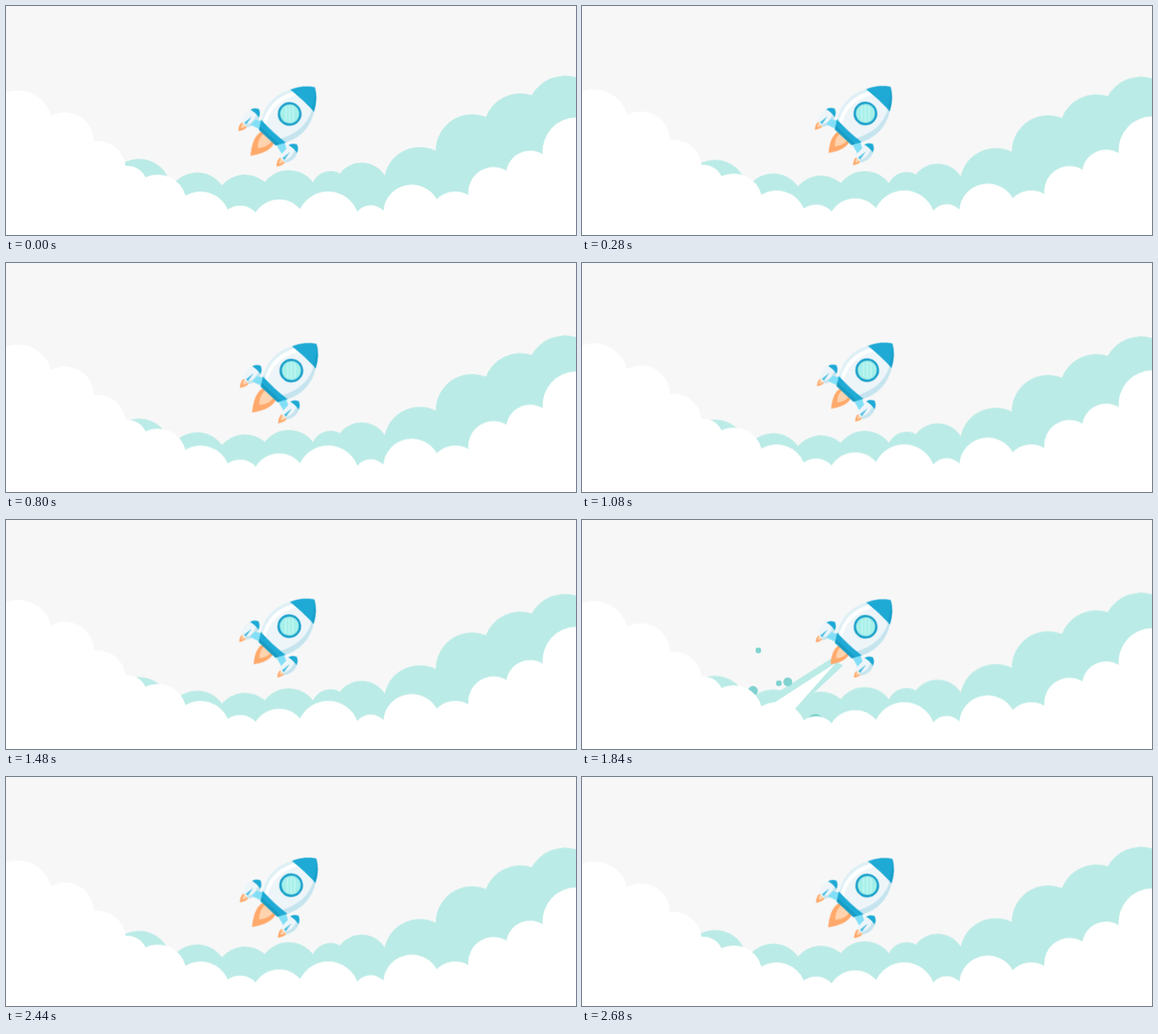
An HTML page for the animation above (2720 ms loop, 640 px wide and 258 px high).

```html
<!DOCTYPE html>
<html lang="en">
<head>
<meta charset="utf-8">
<title>Rocket above the clouds</title>
<style>
  html, body { margin: 0; width: 100%; height: 100%; overflow: hidden; background: #f7f7f7; }
  svg { display: block; width: 100%; height: 100%; }

  #back, #front { animation: drift 2720ms linear infinite; }
  #back { --shift: 5.2px; }
  #front { --shift: -5.8px; }
  @keyframes drift { 50% { transform: translateY(var(--shift)); } }

  #trail, #dots { transform-origin: 222px 212px; animation: 2720ms linear infinite; }
  #trail { animation-name: trail; }
  #dots { animation-name: spray; }
  @keyframes trail {
    0%, 63.2% { transform: scale(0); }
    66%, 70% { transform: none; }
    75%, 100% { transform: scale(0); }
  }
  @keyframes spray {
    0%, 63.2% { transform: scale(0); animation-timing-function: ease-out; }
    67.65% { transform: none; opacity: 1; }
    75% { transform: scale(1.3); opacity: 0; }
    100% { transform: scale(0); opacity: 0; }
  }
</style>
</head>
<body>
<svg viewBox="0 0 640 258">
  <path id="back" fill="#bbebe6" d="M114 208
    A35.5 35.5 0 0 1 184.9 205 A34 34 0 0 1 242.4 202.1 A34 34 0 0 1 290.6 198.2
    A34 34 0 0 1 344.6 198.5 A22 22 0 0 1 375 188.7 A30.5 30.5 0 0 1 425.3 190.9
    A40 40 0 0 1 482.5 163.2 A41 41 0 0 1 538.8 125 A41.5 41.5 0 0 1 590.3 100.5
    A42.5 42.5 0 0 1 640.5 80.6 V270 H114Z"/>

  <g id="trail">
    <path d="M280 156 L293 164 L240 214 L196 209Z" fill="#bbebe6"/>
    <path d="M285 161 L238 214 L211 209Z" fill="#fff"/>
  </g>
  <g id="dots" fill="#7fd3cf">
    <circle cx="198" cy="147" r="3.2"/>
    <circle cx="221" cy="184" r="3.2"/>
    <circle cx="231" cy="182.5" r="5"/>
    <circle cx="192" cy="192.5" r="5.5"/>
    <circle cx="262" cy="228" r="9.5"/>
  </g>

  <path id="front" fill="#fff" d="M0 97.6
    A38.5 38.5 0 0 1 50.7 124.2 A32 32 0 0 1 98.5 152.3 A32 32 0 0 1 134.3 180.2
    A22 22 0 0 1 156.6 193.1 A32 32 0 0 1 201.5 213.8 A33 33 0 0 1 249 229.2
    A24 24 0 0 1 280.3 232.7 A31 31 0 0 1 330.2 228.8 A35 35 0 0 1 394.5 231.8
    A19.5 19.5 0 0 1 423.8 230.5 A32 32 0 0 1 483.7 217.8 A29 29 0 0 1 519.2 213
    A28.5 28.5 0 0 1 561.9 185.4 A27 27 0 0 1 602.7 167.1 A38 38 0 0 1 640.5 125.5
    V270 H0Z"/>

  <defs>
    <g id="flame">
      <path d="M-9 0 C-14 10 -7 22 0 31 C7 22 14 10 9 0Z" fill="#ffa96b"/>
      <path d="M-6 0 C-8 8 -4 15 0 19 C4 15 8 8 6 0Z" fill="#ffd3ae"/>
    </g>
    <g id="pod">
      <g class="flame" data-y="42"><use href="#flame" transform="scale(.38)"/></g>
      <path d="M-6.5 26 C-9.5 32 -8 39 -4.5 43.5 H4.5 C8 39 9.5 32 6.5 26Z" fill="#eef5f9"/>
      <path d="M2.5 26 H6.5 C9.5 32 8 39 4.5 43.5 H1 C5 38 5 32 2.5 26Z" fill="#c5e4ee"/>
      <path d="M-6.5 26.5 Q-5 21.5 0 19.5 Q5 21.5 6.5 26.5 Q0 25 -6.5 26.5Z" fill="#1eaad5"/>
      <path d="M0 31 L1.6 42 H-1.6Z" fill="#4fc0e2"/>
    </g>
  </defs>

  <g id="rocket">
    <g class="flame" data-y="34"><use href="#flame"/></g>
    <use href="#pod" x="-29"/>
    <use href="#pod" x="29.5"/>
    <path d="M-17 27 L-24 31 V39 L-14 36Z M17 27 L24 31 V39 L14 36Z" fill="#83dff6"/>
    <path d="M-18 -21 C-28 -4 -27 13 -18 28 H18 C27 13 28 -4 18 -21Z" fill="#eef5f9"/>
    <path d="M-18 -21 C-28 -4 -27 13 -18 28 H-15 C-24 12 -24 -4 -14 -21Z" fill="#def0f5"/>
    <path d="M-14 -21 C-24 -4 -24 12 -15 28 H-11 C-20 12 -19 -4 -9 -21Z" fill="#fff"/>
    <path d="M18 -21 C28 -4 27 13 18 28 H11 C21 12 23 -5 15 -21Z" fill="#c5e4ee"/>
    <path d="M-19 26.5 Q0 28.5 19 26.5 L13 36.5 H-13Z" fill="#1eaad5"/>
    <path d="M-15 33 H15 L13 36.5 H-13Z" fill="#189bc3"/>
    <path d="M-18.2 -20.5 Q-11 -35 0 -41.2 Q11 -35 18.2 -20.5 Q0 -22 -18.2 -20.5Z" fill="#1eaad5"/>
    <path d="M0 -41.2 Q11 -35 18.2 -20.5 L14 -21 Q9 -33 0 -41.2Z" fill="#189fca"/>
    <circle r="12" fill="#a6f0ea" stroke="#1ba0ca" stroke-width="2.6"/>
    <path d="M-4 -8 V8 M0 -9 V9 M4 -8 V8" transform="rotate(-43)" stroke="#c9f7f3" stroke-width="1.3"/>
  </g>
</svg>
<script>
const LOOP = 2720, STEP = 40, STEPS = LOOP / STEP;
const rocket = document.getElementById("rocket");
const flames = document.querySelectorAll(".flame");

function draw() {
  const n = Math.floor((performance.now() + .5) % LOOP / STEP);
  const i = (n + 1) % STEPS;
  const lift = 1 - Math.abs(1 - 2 * n / STEPS);

  // engine rattle: a fast wave sampled once per step
  const shake = Math.cos(2.733 * i - .517);
  const x = 319.25 + 1.25 * shake;
  const y = 121.9 + .5 * shake - 2 * lift;
  rocket.setAttribute("transform", `translate(${x} ${y}) rotate(43)`);

  const size = .88 + .11 * Math.cos(.607 * i - .3);
  flames.forEach(el => el.setAttribute("transform", `translate(0 ${el.dataset.y}) scale(${size})`));
  requestAnimationFrame(draw);
}
draw();
</script>
</body>
</html>
```
